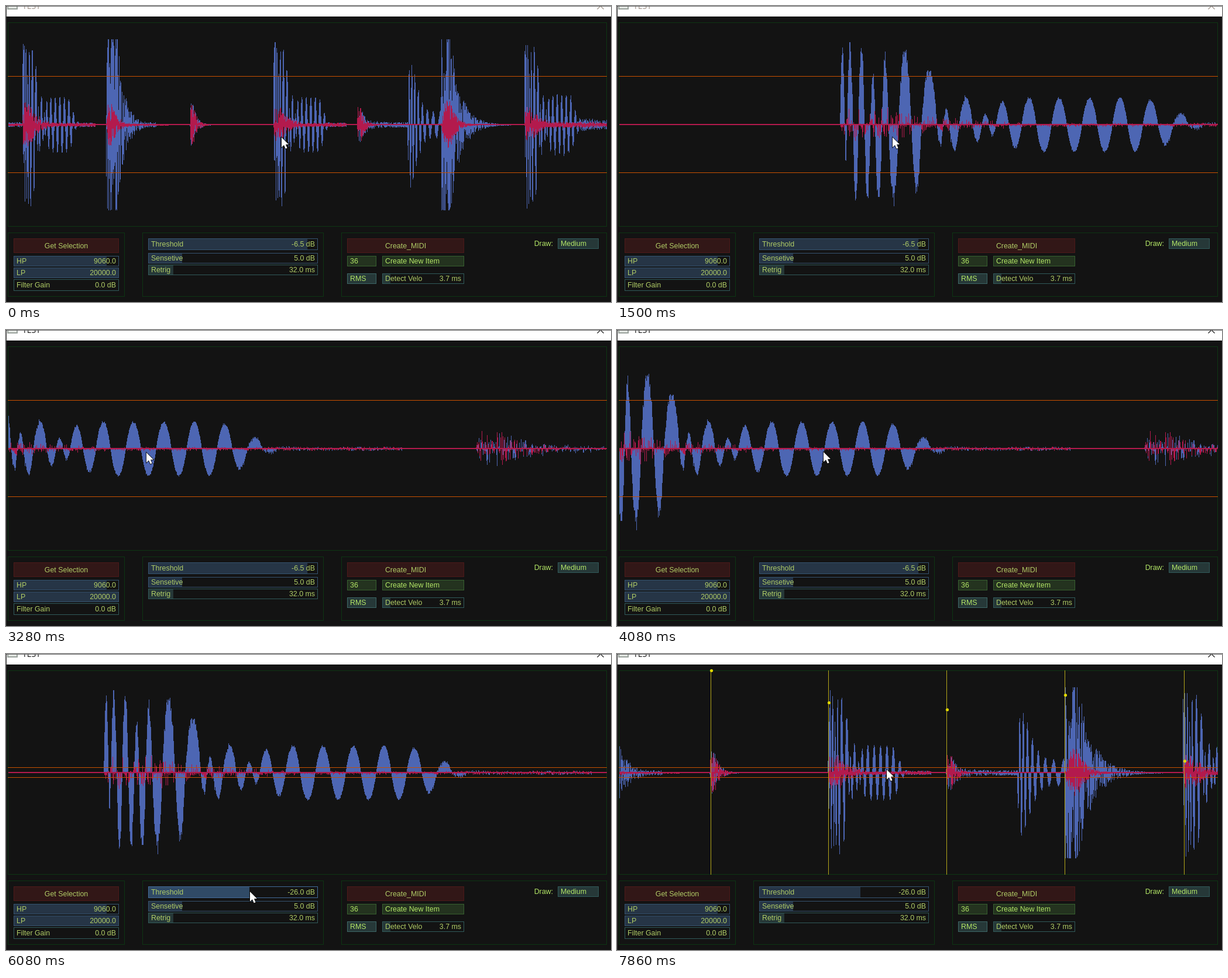
These frames come from a looping animation (1034x507 px, 8 s). An HTML page with a canvas:

```html
<!DOCTYPE html>
<html lang="en">
<head>
<meta charset="utf-8">
<title>Waveform trigger</title>
<style>
  html, body { margin: 0; width: 100%; height: 100%; overflow: hidden; background: #131313; }
  canvas { display: block; }
</style>
</head>
<body>
<canvas id="stage" width="1034" height="507"></canvas>
<script>
const ctx = document.getElementById('stage').getContext('2d');
const LOOP = 8000;
const MID = 203, HALF = 175, PEAK = 146;
const LEFT = 3, RIGHT = 1027;
const FULL = 6.72;          // deepest zoom, also samples per unit of the time axis
const END = 1040;
const COUNT = Math.ceil(END * FULL);

const BLUE = '#4d66b3', RED = '#b31a4d', ORANGE = '#c85000';
const TEXT = '#b0cc66', BRIGHT = '#b3e666';

// ---- sound model ----
let seed = 20177;
function rand() {
  seed = (seed + 0x6D2B79F5) | 0;
  let r = Math.imul(seed ^ (seed >>> 15), 1 | seed);
  r = (r + Math.imul(r ^ (r >>> 7), 61 | r)) ^ r;
  return ((r ^ (r >>> 14)) >>> 0) / 4294967296;
}

const wave = new Float32Array(COUNT);
const filtered = new Float32Array(COUNT);
const fall = (d, centre, width) => 1 / (1 + Math.exp((d - centre) / width));

function addNoise(target, from, to, level) {
  const last = Math.min(COUNT, to * FULL);
  for (let i = Math.ceil(from * FULL); i < last; i++) {
    const r = rand() * 2 - 1;
    target[i] += Math.sign(r) * Math.abs(r) ** 1.6 * level(i / FULL - from);
  }
}

const hiss = (target, from, to, level) => addNoise(target, from, to, () => level);

function burst(target, start, peak, attack, hold, decay) {
  addNoise(target, start, start + hold + 6 * decay,
    d => peak * Math.min(1, d / attack) * Math.exp(-Math.max(0, d - hold) / decay));
}

// alternating half waves; widths are in samples
function addSwings(start, widths, sign, height) {
  let pos = start * FULL;
  for (const w of widths) {
    const end = pos + w;
    const peak = sign * height(end - start * FULL, w);
    for (let i = Math.ceil(pos); i < end && i < COUNT; i++) {
      wave[i] += peak * Math.sin(Math.PI * (i - pos) / w) ** 0.85 * (1 - 0.09 * rand());
    }
    pos = end;
    sign = -sign;
  }
}

// irregular onset, then a steady low tone
const kickWidths = [8, 4, 10, 9.5, 10.5, 10, 8, 11.5, 11.5, 17, 22, 17, 26.5,
  11, 10, 17, 23, 16, 12, 12, 22, 22, 25].concat(Array(13).fill(26));

function kickHeight(d, w) {
  const fit = Math.min(1, w / Math.min(25, 6 + 0.085 * d));
  return (48 + 92 * fall(d, 172, 22)) * fall(d, 588, 18) * fit ** 1.3;
}

function addKick(start, tone) {
  addSwings(start, kickWidths, 1, kickHeight);
  burst(wave, start, 15, 1, 13, 14);
  burst(filtered, start, tone, 1, 13, 14);
  hiss(filtered, start, start + 124, 3);
  hiss(wave, start + 82, start + 124, 3.5);
}

hiss(wave, 0, 28, 4);
hiss(filtered, 0, 28, 2);
addKick(28.4, 38);

burst(wave, 171, 165, 1, 19, 12);
hiss(wave, 171, 257, 4);
burst(filtered, 171, 36, 4, 10, 10);
hiss(filtered, 171, 278, 1.5);

burst(wave, 314.2, 36, 1.5, 6, 7);
burst(filtered, 314.2, 34, 1.5, 6, 7);

addKick(457.4, 28);

burst(wave, 600.2, 30, 1, 8, 9);
hiss(wave, 600.2, 686, 4.5);
burst(filtered, 600.2, 30, 1, 7, 7);

const softWidths = Array.from({ length: 17 }, (_, n) => 12 * 1.09 ** n);
addSwings(686.4, softWidths, -1, d => 20 + 100 * Math.min(1, d / 30) * Math.exp(-((d / 135) ** 2)));
hiss(wave, 686, 743, 5);

burst(wave, 743.2, 168, 1, 15, 18);
burst(filtered, 743.2, 42, 8, 16, 11);

addKick(886.2, 28);
hiss(wave, 886.2, END, 8);
hiss(filtered, 886.2, END, 3);

// ---- timeline: hard steps, a quarter second apart ----
function steps(t, from, n) {
  return Math.max(0, Math.min(n, Math.floor((t - from) / 250) + 1)) / n;
}

// scale and screen position of the middle kick
function viewAt(t) {
  if (t >= 7110) {
    const scale = FULL * 0.21036 ** steps(t, 7110, 4);
    return { scale, x: 412.7 - 36.9 * scale };
  }
  const zoom = 0.24 * (steps(t, 250, 1) + steps(t, 750, 1)) + 0.52 * steps(t, 1000, 3);
  const shift = -538 * steps(t, 3030, 2) - 20 * steps(t, 3530, 1) + 10 * steps(t, 3810, 1)
    + 324 * steps(t, 4080, 3) + 10 * steps(t, 4830, 1);
  const scale = FULL ** zoom;
  return { scale, x: 470.9 + shift - 13.5 * scale };
}

// start time, steps, destination
const moves = [
  [2250, 3, 800, 220], [3030, 2, 240, 210], [4080, 3, 579, 208], [5080, 1, 520, 400],
  [5330, 4, 417, 407], [6860, 2, 414, 198], [7860, 1, 461, 198]
];

function pointerAt(t) {
  let x = 471, y = 225;
  for (const [from, n, toX, toY] of moves) {
    const k = steps(t, from, n);
    x += (toX - x) * k;
    y += (toY - y) * k;
  }
  return { x: Math.round(x), y: Math.round(y) };
}

// the slider follows the pointer while it is dragged
function thresholdAt(t) {
  if (t < 5330) return -6.5;
  const part = (pointerAt(Math.min(t, 6100)).x - 243) / 290;
  return Math.round((part * 57 - 60) * 2) / 2;
}

// position, dot height
const markers = [[28.8, 60], [171.8, 90], [315.8, 28], [458, 83], [600.8, 95], [743.7, 70], [888, 183]];

// ---- drawing ----
function rect(x, y, w, h, color) {
  ctx.fillStyle = color;
  ctx.fillRect(x, y, w, h);
}

function frame(x, y, r, b, color) {
  ctx.strokeStyle = color;
  ctx.lineWidth = 1;
  ctx.strokeRect(x + 0.5, y + 0.5, r - x - 1, b - y - 1);
}

function label(str, x, y, color = TEXT, align = 'left') {
  ctx.font = '12.4px "Liberation Sans", Arial, sans-serif';
  ctx.textAlign = align;
  ctx.fillStyle = color;
  ctx.fillText(str, x, y);
}

function button(str, x, r) {
  rect(x, 398, r - x, 25, '#321717');
  frame(x, 398, r, 423, '#4d1a1a');
  label(str, (x + r) / 2, 415, TEXT, 'center');
}

function box(str, x, y, r, fill, edge) {
  rect(x, y, r - x, 18, fill);
  frame(x, y, r, y + 18, edge);
  label(str, x + 5, y + 13, BRIGHT);
}

function slider(name, value, x, y, r, h, part, fill, edge) {
  rect(x, y, (r - x) * part, h, fill);
  frame(x, y, r, y + h, edge);
  const base = y + (h > 18 ? 14 : 13);
  label(name, x + 5, base);
  label(value, r - 5, base, TEXT, 'right');
}

function titleBar(active) {
  rect(0, 0, 1034, 18, '#ffffff');
  rect(2, 0, 18, 6, '#9aa29c');
  rect(4, 1, 14, 3, '#e4e8e4');
  const ink = active ? '#111111' : '#9c8f86';
  ctx.font = '14px "Open Sans", sans-serif';
  ctx.textAlign = 'left';
  ctx.fillStyle = ink;
  ctx.fillText('TEST', 28, 5);
  ctx.strokeStyle = ink;
  ctx.lineWidth = 1.1;
  ctx.beginPath();
  ctx.moveTo(1010.5, 5.5); ctx.lineTo(1016, 0); ctx.lineTo(1021.5, 5.5);
  ctx.stroke();
  rect(0, 0, 1034, 1, '#686868');
  rect(0, 0, 1, 507, '#2c2c2c');
}

function drawWave(data, color, toTime) {
  ctx.fillStyle = color;
  for (let x = LEFT + 1; x < RIGHT; x++) {
    const from = Math.max(0, Math.floor(toTime(x) * FULL));
    const to = Math.min(COUNT, Math.max(from + 1, Math.floor(toTime(x + 1) * FULL)));
    let lo = 0, hi = 0;
    for (let i = from; i < to; i++) {
      if (data[i] < lo) lo = data[i];
      if (data[i] > hi) hi = data[i];
    }
    const top = Math.round(MID - Math.min(hi, PEAK));
    const bottom = Math.round(MID - Math.max(lo, -PEAK)) + 1;
    ctx.fillRect(x, top, 1, bottom - top);
  }
}

function drawMarkers(toX) {
  for (const [u, y] of markers) {
    const x = Math.floor(toX(u));
    if (x < LEFT || x >= RIGHT) continue;
    rect(x, 28, 1, 350, '#b3a61a');
    ctx.fillStyle = '#e0d800';
    ctx.beginPath();
    ctx.arc(x + 1.5, y + 0.5, 2.6, 0, 7);
    ctx.fill();
  }
}

function drawPointer({ x, y }) {
  ctx.beginPath();
  [[0, 0], [0, 17], [4, 13.2], [6.8, 19.5], [9.6, 18.3], [7, 12.2], [12, 12]]
    .forEach(([dx, dy]) => ctx.lineTo(x + dx, y + dy));
  ctx.closePath();
  ctx.strokeStyle = '#000000';
  ctx.lineWidth = 1.5;
  ctx.stroke();
  ctx.fillStyle = '#ffffff';
  ctx.fill();
}

function drawPanels(db, dragging) {
  const blue = '#263546', blueEdge = '#35536f', teal = '#263838', tealEdge = '#315a5a';
  const green = '#24331f', greenEdge = '#37602f', border = '#0d3513';
  frame(3, 388, 203, 498, border);
  frame(233, 388, 543, 498, border);
  frame(573, 388, 1027, 498, border);

  button('Get Selection', 13, 193);
  slider('HP', '9060.0', 13, 428, 193, 18, 0.883, blue, blueEdge);
  slider('LP', '20000.0', 13, 448, 193, 18, 1, blue, blueEdge);
  slider('Filter Gain', '0.0 dB', 13, 468, 193, 20, 0, teal, tealEdge);

  slider('Threshold', db.toFixed(1) + ' dB', 243, 398, 533, 20, (db + 60) / 57,
    dragging ? '#304a66' : blue, dragging ? '#426a98' : blueEdge);
  slider('Sensetive', '5.0 dB', 243, 423, 533, 18, 0.2, blue, blueEdge);
  slider('Retrig', '32.0 ms', 243, 443, 533, 18, 0.148, teal, tealEdge);

  button('Create_MIDI', 583, 783);
  box('36', 583, 428, 633, green, greenEdge);
  box('Create New Item', 643, 428, 783, green, greenEdge);
  box('RMS', 583, 458, 633, teal, '#3d6666');
  slider('Detect Velo', '3.7 ms', 643, 458, 783, 18, 0.1, teal, tealEdge);
  label('Draw:', 935, 411, BRIGHT, 'right');
  box('Medium', 943, 398, 1013, teal, tealEdge);
}

function draw(t) {
  const view = viewAt(t);
  const db = thresholdAt(t);
  const toTime = x => 457.4 + (x - view.x) / view.scale;
  const toX = u => view.x + (u - 457.4) * view.scale;

  rect(0, 0, 1034, 507, '#131313');
  titleBar(t >= 2250);
  frame(3, 28, 1027, 378, '#0d3513');

  drawWave(wave, BLUE, toTime);
  drawWave(filtered, RED, toTime);
  rect(LEFT + 1, MID - 1, RIGHT - LEFT - 1, 2, RED);

  const h = HALF * 10 ** (db / 20);
  rect(LEFT, Math.round(MID - h), RIGHT - LEFT, 1, ORANGE);
  rect(LEFT, Math.floor(MID + h), RIGHT - LEFT, 1, ORANGE);
  if (t >= 6610) drawMarkers(toX);

  drawPanels(db, t >= 5330 && t < 6860);
  drawPointer(pointerAt(t));
}

function tick() {
  draw(performance.now() % LOOP);
  requestAnimationFrame(tick);
}
tick();
</script>
</body>
</html>
```
